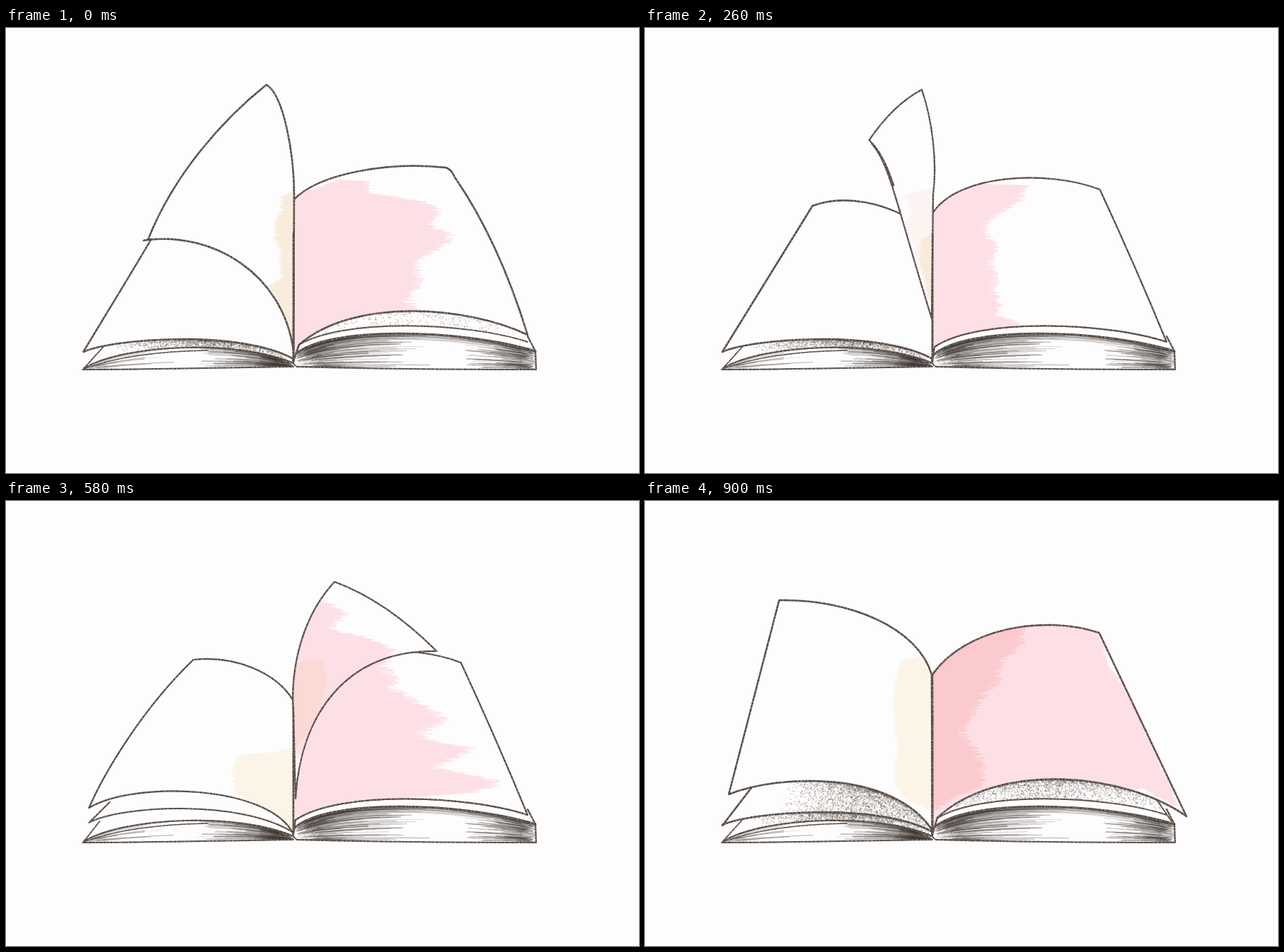
An HTML page with a canvas that plays this animation: 892x628 px, repeating every 920 ms.

```html
<!DOCTYPE html>
<html lang="en">
<head>
<meta charset="utf-8">
<title>Turning pages</title>
<style>
html, body { margin: 0; width: 100%; height: 100%; overflow: hidden; background: #fefdfd; }
canvas { display: block; }
</style>
</head>
<body>
<canvas id="stage" width="892" height="628"></canvas>
<script>
const W = 892, H = 628, LOOP = 920;
const INK = '#5a5049', PAPER = '#fefdfd';
const PINK = '#fddfe3', BLUSH = '#fdeaed', ROSE = '#fcc9cc', PEACH = '#fcd9d3', CREAM = '#fcf5e6', SAND = '#faecda';

// Bezier curves of the two page blocks: four points each
const LEFT_TOP = [110, 480, 170, 445, 330, 440, 405, 473];
const LEFT_BOTTOM = [108, 482, 210, 482, 310, 479, 405, 478];
const RIGHT_TOP = [406, 462, 450, 420, 640, 424, 746, 456];
const RIGHT_BOTTOM = [410, 478, 520, 481, 640, 482, 747, 482];
const SHEET = [408, 450, 470, 408, 650, 415, 735, 443];
const LEFT_SHEET = [109, 457, 150, 438, 330, 425, 405, 467];

const LEFT_PAGE = 'M236 251C275 236 340 240 405 290L405 467C330 425 150 438 109 457Z';
const RIGHT_PAGE = 'M405 262C440 205 570 200 641 228C672 295 705 370 735 443C650 415 470 408 408 450L405 470Z';

let ctx, seed, lineWidth;
const rand = () => (seed = (seed * 1664525 + 1013904223) >>> 0) / 4294967296;
const mix = (a, b, k) => a + (b - a) * k;

function bezier(c, t) {
  const u = 1 - t;
  return [0, 1].map(i => u * u * u * c[i] + 3 * u * u * t * c[i + 2] + 3 * u * t * t * c[i + 4] + t * t * t * c[i + 6]);
}

function between(a, b, t, v) {
  const p = bezier(a, t), q = bezier(b, t);
  return [mix(p[0], q[0], v), mix(p[1], q[1], v)];
}

const curvePath = c => `M${c[0]} ${c[1]}C${c.slice(2).join(' ')}`;

// Solid line broken up by a few pale and dark grains
function pencil(d, width = lineWidth) {
  const path = new Path2D(d);
  const pass = (color, w, dash) => {
    ctx.strokeStyle = color;
    ctx.lineWidth = w;
    ctx.setLineDash(dash);
    ctx.stroke(path);
  };
  const grains = gap => Array.from({ length: 24 }, (_, i) => (i % 2 ? gap : 1) * (0.6 + rand() * 2));
  ctx.lineCap = ctx.lineJoin = 'round';
  pass(INK, width, []);
  ctx.lineCap = 'butt';
  pass('rgba(254,253,253,.35)', width * 0.6, grains(2));
  pass('rgba(60,52,46,.4)', width + 0.3, grains(2));
  ctx.setLineDash([]);
}

// Streaks running along the block from one end
function hatch(top, bottom, from, reach, count) {
  ctx.strokeStyle = '#3d3530';
  for (let i = 0; i < count; i++) {
    const v = Math.pow(rand(), 1.25);
    const length = reach * Math.pow(rand(), 1.3);
    const start = from + (from ? -1 : 1) * rand() * reach * 0.25;
    const end = from ? start - length : start + length;
    ctx.globalAlpha = 0.15 + rand() * 0.35;
    ctx.lineWidth = 0.4 + rand() * 0.9;
    ctx.beginPath();
    for (let k = 0; k <= 8; k++) {
      const t = Math.min(1, Math.max(0, mix(start, end, k / 8)));
      ctx.lineTo(...between(top, bottom, t, v));
    }
    ctx.stroke();
  }
  ctx.globalAlpha = 1;
}

// Graphite grain under a sheet, darkest along its edge
function grain(top, bottom, count, from, to) {
  ctx.fillStyle = INK;
  for (let i = 0; i < count; i++) {
    const t = mix(from, to, (rand() + rand()) / 2);
    const [x, y] = between(top, bottom, t, Math.pow(rand(), 2));
    ctx.globalAlpha = 0.15 + rand() * 0.35;
    ctx.fillRect(x, y, 1.4, 1.4);
  }
  ctx.globalAlpha = 1;
}

// Watercolour patch with a soft dry-brush edge, row by row
function wash(d, color, ragged) {
  const path = new Path2D(d);
  ctx.fillStyle = color;
  ctx.globalAlpha = 0.55;
  for (let y = 110; y < 480; y += 2) {
    ctx.save();
    ctx.beginPath();
    ctx.rect(0, y, W, 2);
    ctx.clip();
    for (let layer = 0; layer < 3; layer++) {
      const shift = ragged * (Math.sin(y * 0.13) * 0.3 + rand() * 1.2 - 0.6);
      ctx.translate(shift, 0);
      ctx.fill(path);
      ctx.translate(-shift, 0);
    }
    ctx.restore();
  }
  ctx.globalAlpha = 1;
}

function page(d, washes = [], width) {
  const path = new Path2D(d);
  ctx.fillStyle = PAPER;
  ctx.fill(path);
  ctx.save();
  ctx.clip(path);
  washes.forEach(w => wash(...w));
  ctx.restore();
  pencil(d, width);
}

function blocks() {
  hatch(LEFT_TOP, LEFT_BOTTOM, 1, 0.4, 170);
  hatch(LEFT_TOP, LEFT_BOTTOM, 0, 0.45, 26);
  hatch(RIGHT_TOP, RIGHT_BOTTOM, 0, 0.5, 190);
  hatch(RIGHT_TOP, RIGHT_BOTTOM, 1, 0.26, 170);
  const band = RIGHT_TOP.map((n, i) => i % 2 ? n + 8 : n);
  hatch(RIGHT_TOP, band, 0, 1.1, 30);
  [LEFT_TOP, LEFT_BOTTOM, RIGHT_BOTTOM].forEach(c => pencil(curvePath(c), 2.2));
  pencil(curvePath(RIGHT_TOP), 3);
  pencil('M110 481C160 462 225 456 285 455', 1.3);
  pencil('M406 462Q401 473 410 478', 1.6);
  pencil('M735 435L746 456L747 482', 2.2);
  pencil(curvePath(SHEET), 2);
}

const leftEdge = () => pencil('M138 449L110 480', 1.8);

function openLeft() {
  leftEdge();
  grain(LEFT_SHEET, LEFT_TOP, 1700, 0.2, 1);
  page(LEFT_PAGE, [], 2.5);
}

const drawings = [
  { at: 0, line: 2.5, draw() {
    grain([413, 447, 490, 380, 650, 392, 735, 433], SHEET, 350, 0.1, 0.95);
    page('M405 243C440 205 540 188 620 197Q628 200 632 210C672 268 708 345 735 433C650 392 490 380 413 447L405 470Z', [
      ['M380 235L420 232L470 214L505 216L512 232L585 244L605 260L598 276L625 292L612 307L585 325L574 345L580 365L568 385L577 405L400 475Z', PINK, 14]]);
    leftEdge();
    grain(LEFT_SHEET, LEFT_TOP, 1700, 0.2, 1);
    page('M215 280C185 333 143 400 109 457C150 438 330 425 405 467L405 243Z');
    page('M367 80C307 128 237 205 200 299C290 288 390 345 405 455L406 235C406 180 392 95 367 80Z', [
      ['M390 238L410 230L410 440L390 410L372 365L388 350L390 318L378 300Z', SAND, 6]]);
    pencil('M194 300L204 298');
  } },
  { at: 40, line: 2.4, draw() {
    page('M405 245C440 205 560 185 637 219C670 290 705 365 739 443C650 400 490 400 412 447L405 470Z', [
      ['M380 240L440 228L514 224L485 246L468 270L500 296L513 330L512 365L500 388L640 391L575 405L490 420L400 475Z', PINK, 16]]);
    openLeft();
    page('M390 87C340 115 280 165 248 213C310 235 390 350 404 450L406 235C412 190 405 130 390 87Z', [
      ['M385 228L410 220L410 450L385 370L350 305L330 265L350 270L370 255Z', SAND, 8],
      ['M391 285L395 282L392 320L390 365L387 362L388 320Z', '#e9e3cf', 1]]);
  } },
  { at: 200, line: 2.2, draw() {
    page(RIGHT_PAGE, [
      ['M380 235L470 220L540 222L530 242L495 260L478 285L492 315L488 350L500 385L490 405L530 417L400 475Z', PINK, 12]]);
    openLeft();
    page('M390 87C360 103 335 130 316 158C345 190 350 235 404 410L406 235C412 190 405 130 390 87Z', [
      ['M370 235L410 225L410 400L390 345L375 290Z', '#fdf3f0', 10],
      ['M388 300L410 285L410 405L390 345Z', SAND, 4]]);
    pencil('M320 163C335 180 343 202 350 222', 3);
  } },
  { at: 380, line: 2.1, draw() {
    pencil('M152 428L110 480', 1.8);
    page('M274 231C300 228 370 245 405 288L405 470C370 400 170 405 123 437C160 375 205 290 274 231Z', [
      ['M375 305L410 295L410 475L360 432L364 390L357 360L368 335Z', CREAM, 6]]);
    page(RIGHT_PAGE, [
      ['M380 260L440 233L510 232L500 265L475 300L525 330L490 365L510 395L450 420L400 475Z', BLUSH, 22],
      ['M380 260L430 245L470 260L462 295L445 330L452 365L420 384L435 415L400 475Z', PINK, 12]]);
    page('M433 79C390 140 402 230 404 290L407 370C408 280 425 180 469 130Q450 105 433 79Z', [
      ['M400 186L424 181L428 200L418 250L400 260Z', PEACH, 4]]);
  } },
  { at: 540, line: 2.2, draw() {
    pencil('M132 452L110 480', 1.8);
    pencil('M146 425L117 454C160 430 330 420 405 468', 2);
    page('M264 224C320 218 380 240 405 282L405 470C370 400 180 395 117 433C140 380 195 290 264 224Z', [
      ['M330 358L380 354L410 345L410 475L355 430L320 408L322 375Z', CREAM, 6]]);
    page(RIGHT_PAGE, [
      ['M380 250L470 230L540 225L535 260L575 280L610 310L590 335L650 350L610 375L690 397L650 412L550 420L400 475Z', PINK, 22]]);
    page('M463 114C420 160 400 230 405 300L408 420C415 300 480 210 607 212C570 175 520 135 463 114Z', [
      ['M380 150L450 140L472 160L460 180L515 195L540 212L545 245L400 370Z', PINK, 14],
      ['M400 240L425 223L448 227L450 265L430 320L400 360Z', PEACH, 5]]);
  } },
  { at: 700, line: 2, draw() {
    pencil('M150 432L110 480', 1.8);
    pencil('M147 405L117 439C170 415 330 410 405 470', 2);
    page('M250 219C310 205 385 230 405 275L405 468C350 395 180 390 109 418C135 360 190 270 250 219Z', [
      ['M410 322L370 335L340 352L275 375L255 398L310 412L410 475Z', CREAM, 14]]);
    page('M716 402L741 450C650 415 470 408 407 452L480 360L690 360Z', [
      ['M400 360L660 370L655 388L632 402L638 424L400 455Z', PINK, 6]]);
    page('M405 275C430 200 510 155 590 156Q600 160 605 170C650 235 690 325 733 412C640 360 480 335 407 452L405 470Z', [
      ['M380 215L460 190L545 200L585 240L555 262L535 300L570 318L645 312L650 340L670 358L640 385L400 475Z', PINK, 16],
      ['M380 230L440 212L490 225L515 255L505 285L490 320L515 340L500 370L450 400L400 445Z', ROSE, 14]]);
  } },
  { at: 880, line: 2.5, draw() {
    leftEdge();
    grain(LEFT_SHEET, LEFT_TOP, 1700, 0.2, 1);
    pencil('M152 402L109 458');
    pencil(curvePath(LEFT_SHEET));
    grain([118, 414, 190, 385, 350, 380, 405, 465], LEFT_SHEET, 2800, 0.3, 1);
    page('M189 140C290 138 385 180 404 245L405 465C350 380 190 385 118 414C140 330 165 235 189 140Z', [
      ['M365 225L410 212L410 440L365 418L352 400L356 340L350 290L354 245Z', CREAM, 4]]);
    grain([412, 447, 500, 365, 680, 385, 763, 445], SHEET, 2200, 0.08, 0.95);
    pencil('M715 413L742 452', 1.8);
    page('M405 245C450 180 560 160 640 186C675 260 720 355 763 445C680 385 500 365 412 447L405 470Z', [
      ['M380 160L635 178L652 228L690 290L752 432L700 405L400 475Z', PINK, 4],
      ['M380 180L540 178L518 210L500 235L480 275L450 310L455 345L480 375L465 405L400 440Z', ROSE, 14]]);
  } }
];

for (const d of drawings) {
  d.sheet = Object.assign(document.createElement('canvas'), { width: W, height: H });
  ctx = d.sheet.getContext('2d');
  seed = 7;
  lineWidth = d.line;
  ctx.fillStyle = PAPER;
  ctx.fillRect(0, 0, W, H);
  blocks();
  d.draw();
  pencil('M405 290L405 472');
}

const stage = document.getElementById('stage').getContext('2d');
const begin = performance.now();

function render() {
  const t = Math.max(0, performance.now() - begin) % LOOP;
  stage.drawImage(drawings.filter(d => d.at <= t).pop().sheet, 0, 0);
  requestAnimationFrame(render);
}
render();
</script>
</body>
</html>
```
